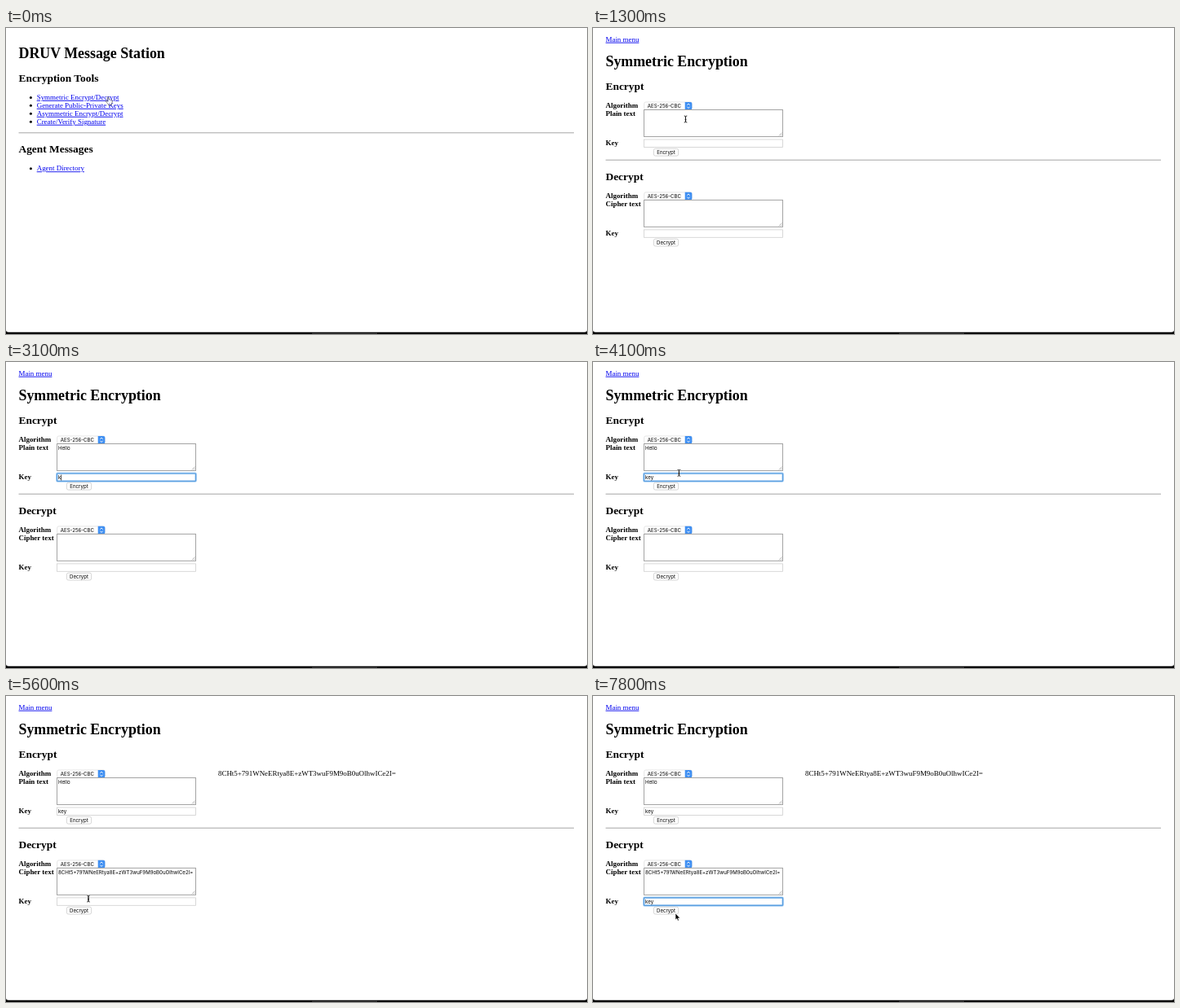
An HTML page for the animation above (8 s loop, 712x376 px).

```html
<!DOCTYPE html>
<html lang="en">
<head>
<meta charset="utf-8">
<title>Symmetric Encryption</title>
<style>
  html, body { margin: 0; width: 100%; height: 100%; overflow: hidden; background: #fff; }
  svg { display: block; width: 100vw; height: 100vh; }
  text { font: 8.93px "Liberation Serif", "Times New Roman", serif; white-space: pre; }
  .h1 { font-size: 17.86px; font-weight: bold; }
  .h2 { font-size: 13.4px; font-weight: bold; }
  .label { font-weight: bold; }
  .link { fill: #00e; text-decoration: underline; }
  .ui { font: 6.1px Inter, "Open Sans", sans-serif; }
</style>
</head>
<body>
<svg id="stage" viewBox="0 0 712 376" xmlns="http://www.w3.org/2000/svg"></svg>
<script>
const LOOP = 8000, STEP = 100;
const CIPHER = "8CHt5+791WNeERtya8E+zWT3wuF9M9oB0uOlhwICe2I=";
const stage = document.getElementById("stage");

const text = (cls, x, y, s, extra = "") => `<text class="${cls}" x="${x}" y="${y}" ${extra}>${s}</text>`;
const box = (x, y, w, h, fill, stroke = "none", extra = "") =>
  `<rect x="${x}" y="${y}" width="${w}" height="${h}" fill="${fill}" stroke="${stroke}" ${extra}/>`;
const rule = y => box(15.5, y, 680.5, 1, "#a6a6a6");
const bullet = (y, s) => `<circle cx="30.4" cy="${y - 2.5}" r="1.5"/>` + text("link", 37.7, y, s);

const ring = (id, y, h) => `<g id="${id}" fill="none">
  ${box(62.3, y, 170.4, h, "none", "#a9d0f5", 'stroke-width="2.4" rx="1"')}
  ${box(62.5, y + 0.2, 170, h - 0.4, "none", "#5b9fe0", 'stroke-width="1.2" rx=".6"')}</g>`;

// One form; both halves of the page share this layout.
function form(name, title, field, dy) {
  return `<g transform="translate(0 ${dy})">
    ${text("h2", 15.5, 75.7, title)}
    ${text("label", 15.5, 97.9, "Algorithm")}
    ${box(62.7, 91, 58.6, 9.2, "#fff", "#d4d4d4", 'stroke-width=".6" rx="2"')}
    <path d="M112.7 90.9h6.6q2 0 2 2v5.6q0 2-2 2h-6.6z" fill="#3f8ff2"/>
    <path d="M115.3 94.8l1.7-1.8 1.7 1.8M115.3 96.7l1.7 1.8 1.7-1.8" fill="none" stroke="#fff" stroke-width=".9"/>
    ${text("ui", 66.8, 97.9, "AES-256-CBC")}
    ${text("label", 15.5, 108, field)}
    ${box(62.5, 100.5, 170, 33, "#fff", "#a4a4a4")}
    <path d="M227.8 132.5l4-4M230 132.5l1.8-1.8" stroke="#888" stroke-width=".6"/>
    ${text("label", 15.5, 144.2, "Key")}
    ${box(62.5, 137, 170, 9.4, "#fff", "#cfcfcf", 'stroke-width=".8"')}
    ${ring(name + "AreaRing", 100.4, 33.4)}
    ${ring(name + "KeyRing", 136.8, 9.8)}
    ${text("ui", 64, 108, "", `id="${name}Area"`)}
    ${text("ui", 64, 144.2, "", `id="${name}Key"`)}
    ${box(74.4, 148.3, 30.2, 8.8, "#fff", "#c4c4c4", 'stroke-width=".7" rx="2"')}
    ${text("ui", 89.5, 154.9, title, 'text-anchor="middle"')}
  </g>`;
}

stage.innerHTML = `
  ${box(0, 0, 712, 376, "#fff")}
  <g id="menu">
    ${text("h1", 15.5, 36.7, "DRUV Message Station")}
    ${text("h2", 15.5, 65.7, "Encryption Tools")}
    ${["Symmetric Encrypt/Decrypt", "Generate Public-Private Keys", "Asymmetric Encrypt/Decrypt", "Create/Verify Signature"]
      .map((s, i) => bullet(87.9 + i * 9.95, s)).join("")}
    ${rule(128.3)}
    ${text("h2", 15.5, 153.4, "Agent Messages")}
    ${bullet(175.3, "Agent Directory")}
  </g>
  <g id="tool">
    ${text("link", 15.5, 16.7, "Main menu")}
    ${text("h1", 15.5, 46.7, "Symmetric Encryption")}
    ${form("enc", "Encrypt", "Plain text", 0)}
    ${text("", 260, 97.9, CIPHER, 'id="result"')}
    ${rule(161.7)}
    ${form("dec", "Decrypt", "Cipher text", 110.9)}
  </g>
  <g id="status">
    ${box(-1, 364.3, 238.7, 11, "#efefef", "#d2d2d2", 'stroke-width=".7" rx="1"')}
    ${text("ui", 2, 371.2, "Waiting for apex-dvorn58206.codeanyapp.com...", 'fill="#777"')}
  </g>
  <path d="M0 371Q0 373.8 3 373.8H709Q712 373.8 712 371V376H0z"/>
  ${box(375, 374.8, 80, 1.2, "#3a3a3a")}
  <path id="caret" stroke="#000" stroke-width=".7"/>
  <g id="pointer">
    <path id="hand" d="M-1.7 -4.2Q-1.6 -5.2 -.9 -5.1Q-.2 -5 0 -4L.4 -1.6Q1.2 -2.3 1.8 -1.4Q2.6 -1.9 3.1 -.9Q4.1 -1.1 4.2 0Q4.4 2 3.4 3.4V5H-.8V3.9Q-2.6 2.2 -3.6 .4Q-3.9 -.8 -2.7 -.5L-1.2 .7z"
      fill="#fff" stroke="#111" stroke-width=".85" stroke-linejoin="round"/>
    <path id="arrow" d="M0 0V8.1L1.8 6.5L3 9.2L4.4 8.6L3.2 6H5.7z" stroke="#fff" stroke-width=".6"/>
    <g id="beam" fill="none">
      <path d="M-1.8 -4Q0 -4 0 -3V3Q0 4 -1.8 4M1.8 -4Q0 -4 0 -3V3Q0 4 1.8 4" stroke="#fff" stroke-width="2" opacity=".8"/>
      <path d="M-1.8 -4Q0 -4 0 -3V3Q0 4 -1.8 4M1.8 -4Q0 -4 0 -3V3Q0 4 1.8 4M-1 .8H1" stroke="#111" stroke-width=".85"/>
    </g>
  </g>`;

const el = {};
stage.querySelectorAll("[id]").forEach(n => el[n.id] = n);
const show = (id, on) => el[id].setAttribute("visibility", on ? "inherit" : "hidden");

// Pointer route: time, x, y.
const route = [
  [0, 126, 89.6], [700, 126, 89.6], [800, 125, 91], [1000, 119, 101], [1300, 113.5, 112],
  [3800, 113.5, 112], [3900, 112, 119], [4100, 105.4, 136.3], [4200, 101, 145], [4400, 97, 152],
  [5200, 97, 152], [5300, 97, 162], [5500, 99.5, 223], [5600, 101, 249], [5800, 104, 253.3],
  [7400, 104, 253.3], [7600, 103, 258], [7700, 102, 264], [7800, 101, 267]
];
// Pointer shape from each time on.
const shapes = [
  [0, "hand"], [800, "arrow"], [1000, "beam"], [1800, ""], [3900, "beam"], [4300, "arrow"],
  [5500, "beam"], [6700, ""], [7500, "beam"], [7700, "arrow"]
];
// Field holding focus: start, end, ring, text node, time the caret goes.
const focus = [
  [1500, 2700, "encAreaRing", "encArea", 2700, 0],
  [2700, 4700, "encKeyRing", "encKey", 3900, 0],
  [6000, LOOP, "decKeyRing", "decKey", 7500, 110.9]
];
const typed = (t, s, times) => s.slice(0, times.filter(k => t >= k).length);

function position(t) {
  const i = route.findIndex(p => p[0] > t);
  if (i < 0) return route[route.length - 1].slice(1);
  const [a, ax, ay] = route[i - 1], [b, bx, by] = route[i], k = (t - a) / (b - a);
  return [ax + (bx - ax) * k, ay + (by - ay) * k];
}

function draw(t) {
  show("menu", t < 300);
  show("tool", t >= 300);
  show("status", t >= 200 && t < 600);
  show("result", t >= 4900);
  el.encArea.textContent = typed(t, "Hello", [1800, 2000, 2100, 2300, 2500]);
  el.encKey.textContent = typed(t, "key", [3100, 3200, 3400]);
  el.decArea.textContent = t >= 4900 ? CIPHER : "";
  el.decKey.textContent = typed(t, "key", [6700, 7000, 7100]);

  show("caret", false);
  show("decAreaRing", false);
  for (const [from, to, halo, field, blur, dy] of focus) {
    const on = t >= from && t < to;
    show(halo, on);
    if (!on || t >= blur) continue;
    const node = el[field], s = node.textContent;
    const x = 64.3 + (s ? node.getComputedTextLength() : 0);
    const y = +node.getAttribute("y") + dy;
    el.caret.setAttribute("d", `M${x} ${y - 5.7}V${y + 1.3}`);
    show("caret", true);
  }

  const shape = shapes.filter(s => t >= s[0]).pop()[1];
  for (const id of ["hand", "arrow", "beam"]) show(id, id === shape);
  el.pointer.setAttribute("transform", `translate(${position(t).join(" ")})`);
  el.pointer.setAttribute("opacity", t < STEP ? 0.6 : 1);
}

const start = performance.now();
function tick() {
  const t = (performance.now() - start) % LOOP;
  draw(Math.floor(t / STEP) * STEP);
  requestAnimationFrame(tick);
}
tick();
</script>
</body>
</html>
```
